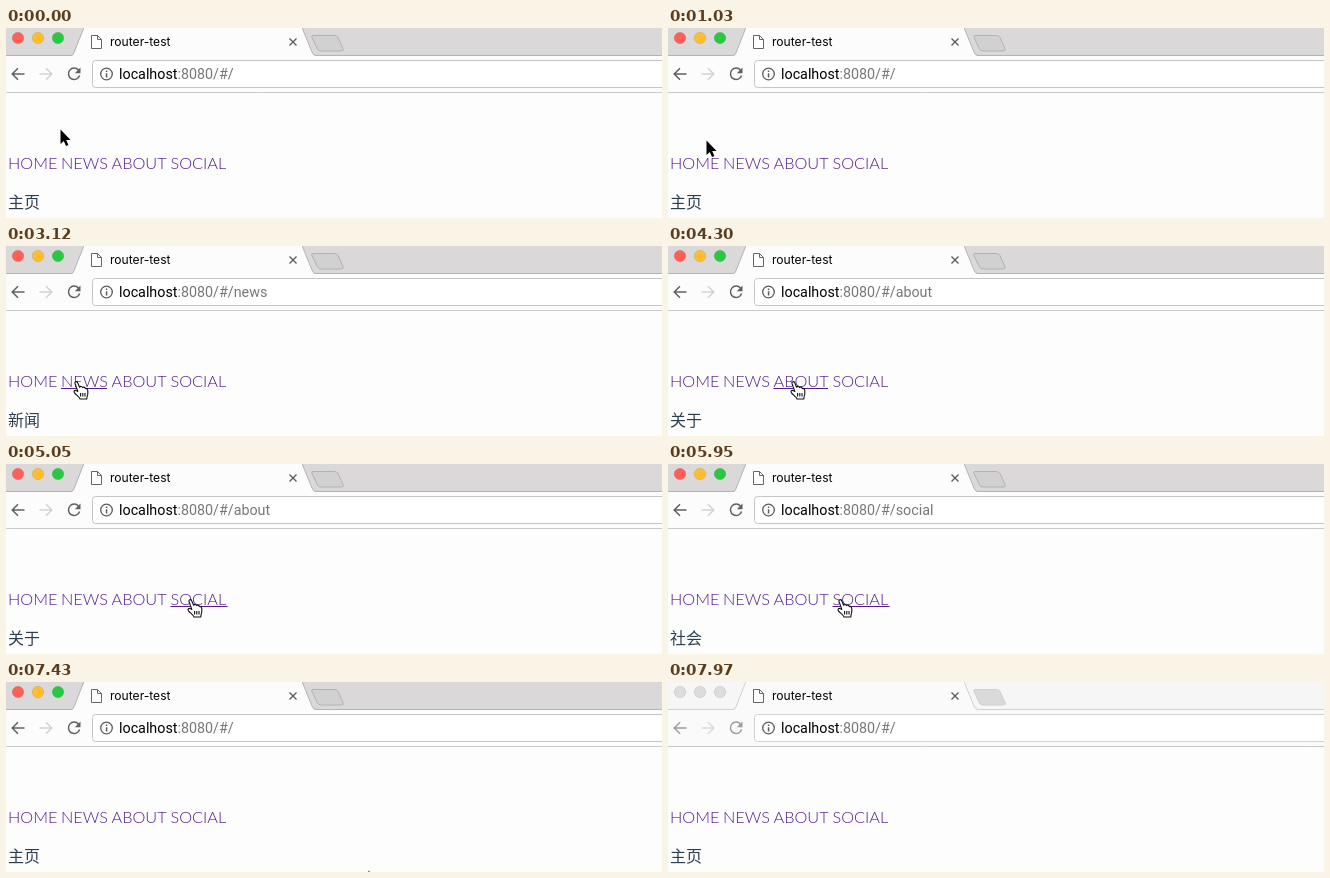
Animation, 656 px wide and 190 px high, one loop 8070 ms. Source, as an HTML page:

```html
<!DOCTYPE html>
<html lang="zh-CN">
<head>
<meta charset="utf-8">
<title>router-test</title>
<style>
  html, body { margin: 0; width: 100%; height: 100%; overflow: hidden; background: #fdfdfd; }
  svg { display: block; width: 656px; height: 190px; cursor: default;
    --strip: #dad8d9; --bar: #fcfcfc; --edge: #b5b3b4; --box: #c6c5c6;
    --icon: #606060; --dim: #d2d2d2; --plus: #d2d1d1; --plusEdge: #b3b1b2;
    --red: #ff5f57; --yellow: #ffbd2e; --green: #28c940; }
  svg.inactive {
    --strip: #f6f6f6; --bar: #fafafa; --edge: #d0d0d0; --box: #d2d2d2;
    --icon: #9c9c9c; --dim: #dadada; --plus: #dadada; --plusEdge: #d0d0d0;
    --red: #dcdcdc; --yellow: #dcdcdc; --green: #dcdcdc; }
  .title { font: 12.1px Inter, sans-serif; fill: #000; }
  .url { font: 14.3px Roboto, sans-serif; fill: #777; }
  .host { fill: #000; }
  .nav { font: 300 16.3px Lato, sans-serif; fill: #551a8b; }
  .nav rect { visibility: hidden; }
  .nav .hover rect { visibility: visible; }
  .nav .pressed { fill: #f00; }
  .body { font: 16px "Noto Sans CJK SC", "Noto Sans CJK", sans-serif; fill: #2c3e50; }
  .line { fill: none; stroke: var(--icon); stroke-width: 1.5; }
  .fine { fill: none; stroke: #5a5a5a; stroke-width: 1.3; }
  .lights { stroke: #000; stroke-opacity: .1; stroke-width: .8; }
</style>
</head>
<body>
<svg id="stage" viewBox="0 0 656 190">
  <rect width="656" height="28" fill="var(--strip)"/>
  <rect y="28" width="656" height="36" fill="var(--bar)"/>
  <path d="M0 27.5H656" stroke="var(--edge)"/>
  <path d="M65 28Q67.5 27.5 68.3 24L77 2L78 -1H296L297 2L306 24Q307 27.5 310 28Z" fill="var(--bar)"/>
  <path d="M65 27.5Q67.5 27.3 68.3 24L77 2L78 -1M296 -1L297 2L306 24Q307 27.3 310 27.5" fill="none" stroke="var(--edge)"/>
  <path d="M307 7.5H328.5Q331 7.5 332 9.5L337 20.5Q338 23 335.5 23H315Q312.5 23 311.5 21L306 9.5Q305 7.5 307 7.5Z" fill="var(--plus)" stroke="var(--plusEdge)"/>

  <g class="lights">
    <circle cx="12" cy="10" r="5.8" fill="var(--red)"/>
    <circle cx="32" cy="10" r="5.8" fill="var(--yellow)"/>
    <circle cx="52" cy="10" r="5.8" fill="var(--green)"/>
  </g>

  <path d="M85.5 7.5H91.5L95.5 11.5V20.5H85.5ZM91.5 7.5V11.5H95.5" fill="#fff" stroke="#666"/>
  <text class="title" x="104" y="18">router-test</text>
  <path class="fine" d="M283.5 10.5L290.5 17.5M290.5 10.5L283.5 17.5"/>

  <path class="line" d="M18.5 46H6.5M12 40.2L6.2 46L12 51.8"/>
  <path class="line" d="M33.5 46H45.5M40 40.2L45.8 46L40 51.8" style="stroke: var(--dim)"/>
  <path class="line" d="M72.6 42.2A5.7 5.7 0 1 0 73.6 47.5"/>
  <path d="M74.5 39.5V45.2H68.8Z" fill="var(--icon)"/>

  <rect x="86.5" y="32.5" width="580" height="27" rx="3" fill="#fff" stroke="var(--box)"/>
  <circle class="fine" cx="100.5" cy="46" r="5.8"/>
  <path d="M99.8 42.4h1.5v1.5h-1.5zM99.8 45.2h1.5v4.2h-1.5z" fill="#5a5a5a"/>
  <text class="url" x="113" y="51"><tspan class="host">localhost</tspan><tspan id="path"></tspan></text>
  <path d="M0 64.5H656" stroke="#cbcacb"/>

  <g class="nav" id="nav"></g>
  <text class="body" id="view" x="2" y="180"></text>

  <g id="cursor">
    <path id="arrow" d="M.5 .5V15L3.8 12L6 17L8.4 16L6.2 11H10.6Z" stroke="#fff" stroke-width="1.2" paint-order="stroke"/>
    <g id="hand" stroke="#111" stroke-width="1.1" stroke-linejoin="round">
      <path fill="#fff" d="M-3 1.5C-3.5 -.5 -1 -1 -.3 .8L1.6 5.2C2.2 4 4 4.2 4.6 5.6C5.3 4.6 7 5 7.4 6.6C8.4 6 9.6 7 9.8 8.6V11.5C9.8 13.5 8.8 14 8.8 17H2C1.5 15 -1 13.5 -3.5 11C-5 9 -3 7.8 -1.5 8.8L-.2 9.4Z"/>
      <path fill="none" d="M2.6 11V14.5M4.8 11V14.5M7 11V14.5"/>
    </g>
  </g>
</svg>
<script>
const LOOP = 8070, BLUR = 7970;
const STEP = 146;   // the pointer moves in steps of this length
const PRESS = 140;  // how long the button is held

const links = [
  { label: "HOME", x: 2, end: 51, grab: 24, path: "", view: "主页" },
  { label: "NEWS", x: 55, end: 101, grab: 72, path: "news", view: "新闻" },
  { label: "ABOUT", x: 105.5, end: 160, grab: 127, path: "about", view: "关于" },
  { label: "SOCIAL", x: 164.5, end: 221.5, grab: 186, path: "social", view: "社会" }
];
const [home, news, about, social] = links;

const spot = (x, y) => ({ x, y });
const visit = (at, steps, link, press) => ({ at, steps, to: spot(link.grab, 136), link, press });
const trips = [
  { at: 290, steps: 2, to: spot(41, 107) },
  visit(890, 4, home, 1630),
  visit(2220, 3, news, 2970),
  visit(3570, 3, about, 4160),
  visit(4750, 3, social, 5500),
  visit(5950, 6, home, 6840),
  { at: 7280, steps: 4, to: spot(700, 240) }
];

const $ = id => document.getElementById(id);
const make = (tag, attrs, parent) => {
  const el = document.createElementNS("http://www.w3.org/2000/svg", tag);
  for (const key in attrs) el.setAttribute(key, attrs[key]);
  return parent.appendChild(el);
};
const smooth = p => p * p * (3 - 2 * p);
const mix = (a, b, p) => a + (b - a) * p;

for (const link of links) {
  link.el = make("g", {}, $("nav"));
  make("text", { x: link.x, y: 141 }, link.el).textContent = link.label;
  make("rect", { x: link.x, y: 142, width: link.end - link.x, height: 1 }, link.el);
}

function stateAt(t) {
  let pos = spot(54, 101), page = home, pressed = false;
  for (const { at, steps, to, link, press } of trips) {
    if (t < at) break;
    const done = Math.min(steps, Math.floor((t - at) / STEP) + 1);
    const p = smooth(done / steps);
    pos = spot(mix(pos.x, to.x, p), mix(pos.y, to.y, p));
    pressed = t >= press && t < press + PRESS;
    if (t >= press + PRESS) page = link;
  }
  return { pos, page, pressed };
}

function draw(t) {
  const { pos: { x, y }, page, pressed } = stateAt(t);
  const over = links.find(l => y > 126 && y < 145 && x >= l.x && x <= l.end);

  for (const link of links) {
    link.el.classList.toggle("hover", link === over);
    link.el.classList.toggle("pressed", link === over && pressed);
  }
  $("path").textContent = ":8080/#/" + page.path;
  $("view").textContent = page.view;
  $("cursor").setAttribute("transform", `translate(${Math.round(x)} ${Math.round(y)})`);
  $("arrow").style.display = over ? "none" : "";
  $("hand").style.display = over ? "" : "none";
  $("stage").classList.toggle("inactive", t >= BLUR);
}

const start = performance.now();
function tick() {
  draw((performance.now() - start) % LOOP);
  requestAnimationFrame(tick);
}
tick();
</script>
</body>
</html>
```
